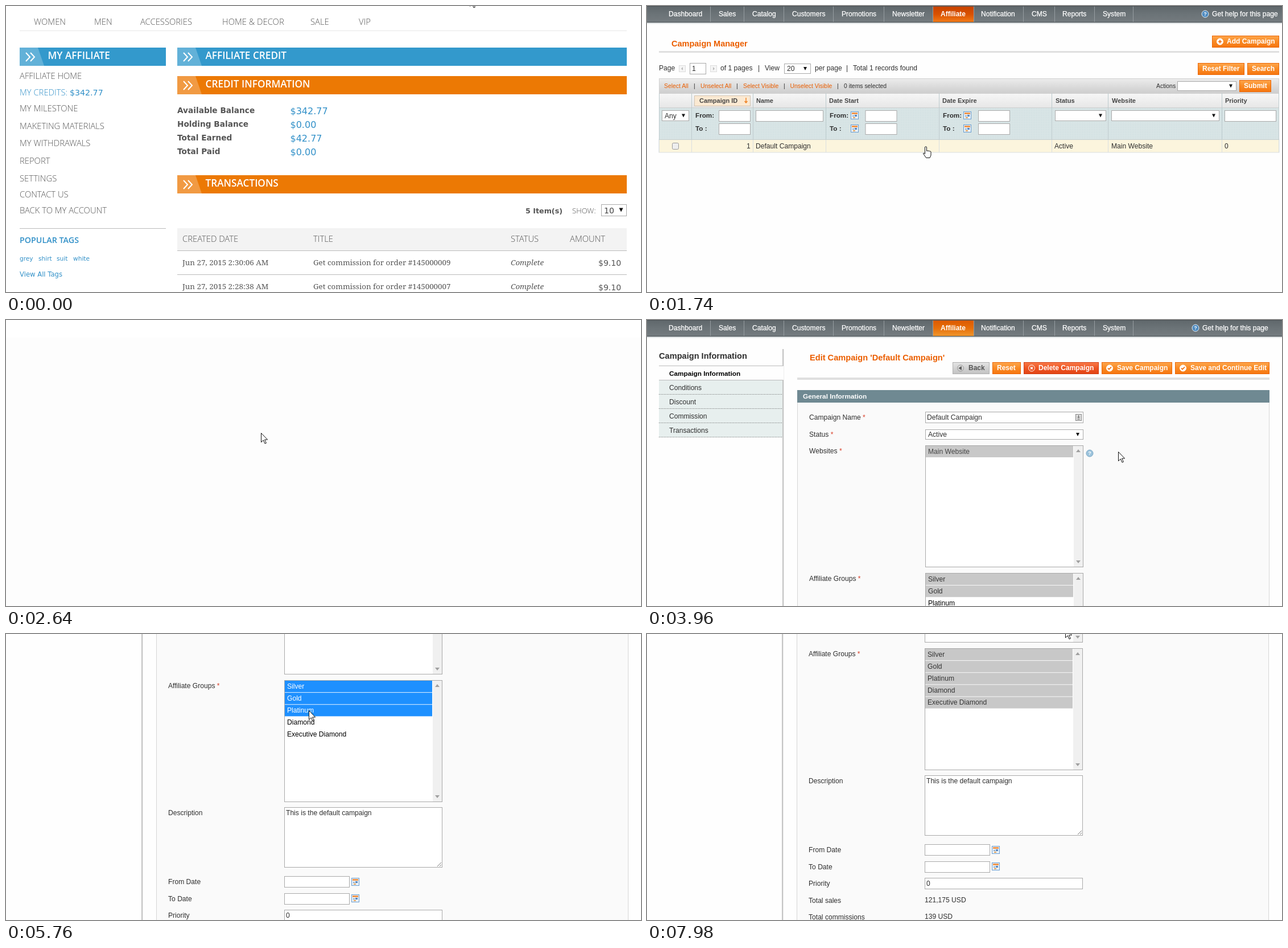
Recreate the animation shown at these times as an HTML page. Size 1116x502 px, loop 8000 ms.

```html
<!DOCTYPE html>
<html lang="en">
<head>
<meta charset="utf-8">
<title>Affiliate campaign walkthrough</title>
<style>
  html, body { margin: 0; width: 100%; height: 100%; overflow: hidden; background: #fff; }
  svg { display: block; width: 1116px; height: 502px; font: 12.1px "Liberation Sans", Arial, sans-serif; }
  text { white-space: pre; }
  .b { font-weight: 700; }
  .shop { font-family: "Open Sans", sans-serif; font-weight: 600; }
  .light { font-weight: 300; }
  .wide { font-family: "DejaVu Sans", Verdana, sans-serif; }
  .serif { font-family: "Noto Serif", Georgia, serif; }
  .nav { stroke: #fff; stroke-width: .25px; }
</style>
</head>
<body>
<svg id="stage" viewBox="0 0 1116 502"></svg>
<script>
const LOOP = 8000, STEP = 60;
const INK = '#2f2f2f', ORANGE = '#eb5e00', BLUE = '#3190c8';

// Drawing helpers. Text is placed by the vertical middle of its capitals, on a whole-pixel baseline.
const text = (x, mid, str, { size = 12.1, fill = INK, cls = '', extra = '' } = {}) =>
  `<text x="${x}" y="${Math.round(mid + size * .36)}" font-size="${size}" fill="${fill}" class="${cls}" ${extra}>${str}</text>`;
const bold = (x, mid, str, fill = INK, size = 12) => text(x, mid, str, { size, fill, cls: 'b' });
const rect = (x, y, w, h, fill, extra = '') =>
  `<rect x="${x}" y="${y}" width="${w}" height="${h}" fill="${fill}" ${extra}/>`;
const path = (d, fill = 'none', extra = '') => `<path d="${d}" fill="${fill}" ${extra}/>`;
const frame = (x, y, w, h, fill = '#fff', line = '#aaa') =>
  rect(x + .5, y + .5, w - 1, h - 1, fill, `stroke="${line}"`);
const each = (list, fn) => list.map(fn).join('');
const gradient = (id, ...stops) => `<linearGradient id="${id}" x2="0" y2="1">` +
  each(stops, (c, i) => `<stop offset="${i / (stops.length - 1)}" stop-color="${c}"/>`) + '</linearGradient>';
const triangle = (x, y, s, fill = '#111') => path(`M${x - s} ${y - s}h${2 * s}l${-s} ${2 * s}z`, fill);
const select = (x, y, w, h, label = '') =>
  frame(x, y, w, h) + text(x + 5, y + h / 2, label) + triangle(x + w - 10, y + h / 2, 3);
const calendar = (x, y) => frame(x, y, 14, 14, '#e8f1fa', '#6d9fd0') + rect(x + 2, y + 2, 10, 3, '#f0954a') +
  rect(x + 3, y + 7, 3, 2, '#8fa9c4') + rect(x + 7, y + 6, 4, 3, '#5b88bd') + rect(x + 4, y + 10, 4, 2, '#e3a35c');
const help = (x, y, dark) => `<circle cx="${x}" cy="${y}" r="6" fill="${dark ? '#4f8bc0' : '#9cc3dc'}" stroke="${dark ? '#e4f0fa' : '#7da9c6'}"/>` +
  text(x, y, '?', { size: 9, fill: '#fff', cls: 'b', extra: 'text-anchor="middle"' });
const button = (x, y, w, label, tx, kind = 'orange', icon = '') => {
  const line = { orange: '#ed6502', red: '#d33c10', grey: '#b0b0b0' }[kind];
  const ink = kind === 'grey' ? '#555' : '#fff';
  const mark = { plus: 'M-3 0h6M0-3v6', tick: 'M-3 0l2 2 4-4', cross: 'M-2-2l4 4M2-2l-4 4', back: 'M1-2l-3 2 3 2z' }[icon];
  const solid = icon === 'plus' || icon === 'tick';
  const badge = icon && `<g transform="translate(${x + 14} ${y + 10.5})"><circle r="5.5" fill="${solid ? '#fff' : 'none'}" stroke="${kind === 'grey' ? '#999' : '#fff'}"/>` +
    path(mark, 'none', `stroke="${solid ? '#ed6502' : ink}" stroke-width="1.7"`) + '</g>';
  return frame(x, y, w, 21, `url(#${kind})`, line) + badge + bold(tx, y + 10, label, ink);
};

function shopPage() {
  const thin = (x, y, s, fill = '#555', size = 14.8) => text(x, y, s, { size, fill, cls: 'shop light' });
  const wide = (x, y, s, size, fill = BLUE, weight = '') => text(x, y, s, { size, fill, cls: 'wide ' + weight });
  const serif = (x, y, s, extra = '') => text(x, y, s, { size: 13.4, fill: '#555', cls: 'serif', extra });
  const bar = (x, y, w, color, light, label) => rect(x, y, w, 32, color) +
    path(`M${x} ${y}h32l11 32h-43z`, light) +
    path(`M${x + 11} ${y + 9}l7 7.5-7 7.5m8-15l7 7.5-7 7.5`, 'none', 'stroke="#fff" stroke-width="2"') +
    text(x + 49.5, y + 14, label, { size: 17.2, fill: '#fff', cls: 'shop' });
  const blue = ['#3399cc', '#62b1d8'], orange = ['#ec7904', '#f19a43'];
  const row = (y, time, order) => serif(310, y, time) + serif(540, y, 'Get commission for order #' + order) +
    serif(887, y, 'Complete', 'font-style="italic"') + wide(1041, y + 1, '$9.10', 14, '#555');
  return rect(0, 0, 1116, 502, '#fff') +
    each([[49, 'WOMEN'], [155, 'MEN'], [236, 'ACCESSORIES'], [380, 'HOME &amp; DECOR'], [535, 'SALE'], [620, 'VIP']],
      ([x, s]) => thin(x, 28, s)) +
    rect(24, 43, 1067, 1, '#e6e6e6') +
    bar(24, 73, 257, ...blue, 'MY AFFILIATE') + bar(301, 73, 790, ...blue, 'AFFILIATE CREDIT') +
    bar(301, 123, 790, ...orange, 'CREDIT INFORMATION') + bar(301, 297, 790, ...orange, 'TRANSACTIONS') +
    each([[123, 'AFFILIATE HOME'], [180, 'MY MILESTONE'], [211, 'MAKETING MATERIALS'], [241, 'MY WITHDRAWALS'],
      [272, 'REPORT'], [303, 'SETTINGS'], [331, 'CONTACT US'], [359, 'BACK TO MY ACCOUNT']], ([y, s]) => thin(24, y, s)) +
    thin(24, 152, 'MY CREDITS:', BLUE) + wide(112, 152, '$342.77', 14.2) +
    rect(24, 390, 257, 1, '#bbb') +
    text(24, 411, 'POPULAR TAGS', { size: 14.3, fill: BLUE, cls: 'shop' }) +
    each([[24, 'grey'], [57, 'shirt'], [89, 'suit'], [118, 'white']], ([x, s]) => wide(x, 443.5, s, 10.6)) +
    wide(24, 471, 'View All Tags', 11.6) +
    each([['Available Balance', '$342.77'], ['Holding Balance', '$0.00'], ['Total Earned', '$42.77'], ['Total Paid', '$0.00']],
      ([name, sum], i) => wide(301, 183 + i * 24, name, 13.7, '#555', 'b') + wide(499.5, 184 + i * 24, sum, 16)) +
    wide(913, 359, '5 Item(s)', 12.7, '#555', 'b') + thin(995, 359.5, 'SHOW:', '#555', 13.2) +
    frame(1046, 348, 45, 21) + wide(1051, 359, '10', 14, '#444') + triangle(1081, 358, 3.5) +
    rect(301, 390, 790, 39, '#f3f3f3') +
    each([[310, 'CREATED DATE'], [540, 'TITLE'], [887, 'STATUS'], [991, 'AMOUNT']], ([x, s]) => thin(x, 408.5, s)) +
    rect(301, 429, 790, 1, '#bbb') + rect(301, 471, 790, 1, '#bbb') +
    row(450, 'Jun 27, 2015 2:30:06 AM', '145000009') + row(492.5, 'Jun 27, 2015 2:28:38 AM', '145000007');
}

function adminNav(activeFill, helpX) {
  const items = [[38, 'Dashboard'], [126, 'Sales'], [185, 'Catalog'], [255, 'Customers'], [342, 'Promotions'],
    [431, 'Newsletter'], [516, 'Affiliate'], [587, 'Notification'], [676, 'CMS'], [730, 'Reports'], [801, 'System']];
  const plain = (x, s) => text(x, 14, s, { fill: '#fff', cls: 'nav' });
  return rect(0, 0, 1116, 28, 'url(#nav)') + rect(0, 0, 1116, 1, '#4a5155') +
    rect(0, 28, 1116, 1, '#4c5356') + rect(0, 29, 1116, 3, 'url(#navShade)') +
    rect(503, 1, 71, 27, `url(#${activeFill})`) +
    each([111, 170, 240, 327, 416, 502, 574, 661, 716, 786, 854], x => rect(x, 1, 1, 27, '#969da1')) +
    each(items, ([x, s]) => s === 'Affiliate' ? bold(x, 14, s, '#fff') : plain(x, s)) +
    help(helpX, 14, true) + plain(helpX + 12, 'Get help for this page');
}

function managerPage() {
  const small = (x, s, fill = ORANGE) => text(x, 140.5, s, { size: 10.4, fill });
  const range = x => frame(x, 183, 56, 20) + frame(x, 206, 56, 20);
  const fromTo = x => bold(x, 192, 'From:', INK, 11.7) + bold(x, 215, 'To :', INK, 11.7);
  const pager = (x, dir) => frame(x, 104, 12, 12, '#f5f5f5', '#ddd') +
    path(`M${x + 6 - dir} 107l${dir * 3} 3l${-dir * 3} 3z`, '#bbb');
  return rect(0, 0, 1116, 502, '#fefefe') + adminNav('hot', 981) +
    bold(43, 66, 'Campaign Manager', ORANGE, 14.5) + button(993, 52, 118, 'Add Campaign', 1019, 'orange', 'plus') +
    rect(21, 79, 1090, 3, '#dfdfdf') +
    text(21, 109, 'Page') + pager(56, -1) + frame(75, 100, 29, 20) + text(79, 110, '1') + pager(111, 1) +
    text(129, 109, 'of 1 pages') + text(195, 109, '|') + text(207, 109, 'View') + select(241, 101, 47, 18, '20') +
    text(295, 109, 'per page') + text(350, 109, '|') + text(362, 109, 'Total 1 records found') +
    button(968, 100, 82, 'Reset Filter', 976) + button(1055, 100, 56, 'Search', 1063) +
    frame(21, 127, 1090, 26, 'url(#mass)', '#d1d1d1') +
    each([[30, 'Select All'], [94, 'Unselect All'], [169, 'Select Visible'], [251.5, 'Unselect Visible']], ([x, s]) => small(x, s)) +
    each([82, 157, 240, 334], x => small(x, '|', INK)) + small(346, '0 items selected', INK) + small(895, 'Actions', INK) +
    select(932, 132, 104, 17) + button(1041, 130, 56, 'Submit', 1049) +
    frame(21, 153, 1090, 26, 'url(#head)', '#cfcfcf') + rect(21, 179, 1090, 55, '#d9e5e6') + rect(21, 179, 1090, 55, 'url(#weave)') +
    `<rect id="row" x="21" y="234" width="1090" height="23" stroke="#dadfe0"/>` +
    each([21, 78, 186, 314, 513, 711, 810, 1010, 1110], x => rect(x, 153, 1, 81, '#bccacd') + rect(x, 234, 1, 23, '#dadfe0')) +
    rect(21, 234, 1090, 1, '#c3cfd1') +
    rect(83.5, 157.5, 98, 18, '#fbe9d2', 'stroke="#b09a80" stroke-dasharray="1 1"') +
    path('M174 161v9m-2.5-3l2.5 3 2.5-3', 'none', 'stroke="#f08020" stroke-width="1.4"') +
    each([[92, 'Campaign ID'], [192, 'Name'], [320, 'Date Start'], [519, 'Date Expire'], [718, 'Status'], [817, 'Website'], [1016, 'Priority']],
      ([x, s]) => bold(x, 166.5, s, '#444', 11)) +
    select(26, 183, 48, 19, 'Any') + each([126, 383.5, 582], range) + each([85, 321, 520], fromTo) +
    each([358, 556], x => calendar(x, 185) + calendar(x, 208)) +
    frame(191, 183, 119, 20) + select(717, 183, 90, 19) + select(816, 183, 190, 19) + frame(1015, 183, 91, 20) +
    rect(44.5, 240.5, 11, 11, '#eee', 'stroke="#999" rx="2"') +
    each([[175, '1'], [191, 'Default Campaign'], [716, 'Active'], [816, 'Main Website'], [1015, '0']], ([x, s]) => text(x, 245.5, s));
}

const groups = ['Silver', 'Gold', 'Platinum', 'Diamond', 'Executive Diamond'];

function editPage() {
  const label = (y, s, must) => text(285, y, s + (must ? ' <tspan fill="#d9402a">*</tspan>' : ''));
  const list = y => frame(489, y, 278, 214, '#fff', '#a9a9a9') + rect(750, y + 1, 16, 212, '#f0f0f0') +
    path(`M754 ${y + 12}l4-5 4 5z`, '#a0a0a0') + path(`M754 ${y + 202}l4 5 4-5z`, '#a0a0a0');
  const tab = (s, i) => rect(21, 106 + i * 25, 218, 25, '#e7efee') + text(39, 119 + i * 25, s) +
    path(`M21 ${130.5 + i * 25}h218`, 'none', 'stroke="#666" stroke-dasharray="1 1.5"');
  return rect(0, 0, 1116, 1000, '#fefefe') + adminNav('warm', 964) +
    bold(21, 63, 'Campaign Information', INK, 14.6) + rect(21, 80, 218, 1, '#bbb') +
    bold(39, 94, 'Campaign Information', '#000', 11.8) + rect(21, 105, 218, 1, '#bbb') +
    each(['Conditions', 'Discount', 'Commission', 'Transactions'], tab) +
    rect(238, 51, 2, 950, '#c4c4c4') + rect(240, 51, 1, 950, '#eee') + rect(236, 81, 4, 24, '#fefefe') +
    bold(286, 66, "Edit Campaign 'Default Campaign'", ORANGE, 14.6) +
    button(537, 74, 65, 'Back', 565, 'grey', 'back') + button(607, 74, 50, 'Reset', 615) +
    button(662, 74, 132, 'Delete Campaign', 688, 'red', 'cross') +
    button(799, 74, 124, 'Save Campaign', 826, 'orange', 'tick') +
    button(928, 74, 166, 'Save and Continue Edit', 955, 'orange', 'tick') +
    rect(264, 101, 830, 4, '#dfdfdf') +
    frame(264, 123, 830, 900, '#fafafa', '#d6d6d6') + rect(264, 123, 830, 22, '#6f8992') +
    bold(274, 134, 'General Information', '#fff', 11.8) +
    label(171, 'Campaign Name', true) + frame(489, 161, 278, 20) + text(492, 171, 'Default Campaign') +
    frame(753, 165, 11, 12, '#ddd', '#888') + path('M758.5 167v4m-2-1l2 2 2-2m-4 4h4', 'none', 'stroke="#555"') +
    label(201, 'Status', true) + select(489, 192, 278, 18, 'Active') +
    label(230, 'Websites', true) + list(220) + rect(490, 221, 259, 20, '#c8c8c8') + text(494, 231, 'Main Website', { fill: '#444' }) +
    help(778, 234) +
    label(453.5, 'Affiliate Groups', true) + list(444) +
    each(groups, (s, i) => `<g class="option">${rect(490, 445 + i * 21.1, 259, 20.2, '#fff')}${text(494, 454.5 + i * 21.1, s)}</g>`) +
    label(677, 'Description') + frame(489, 667, 278, 106, '#fff', '#a9a9a9') + text(492, 677, 'This is the default campaign') +
    path('M758 771l7-7m-3 7l3-3', 'none', 'stroke="#777"') +
    label(797.5, 'From Date') + frame(489, 788, 115, 20) + calendar(607, 791) +
    label(827.5, 'To Date') + frame(489, 818, 115, 20) + calendar(607, 820) +
    label(857, 'Priority') + frame(489, 847, 278, 20) + text(492, 857, '0') +
    label(887, 'Total sales') + text(489, 886, '121,175 USD') +
    label(916, 'Total commissions') + text(489, 915, '139 USD');
}

const defs = gradient('nav', '#5f676b', '#6b7377', '#747b7f') + gradient('navShade', '#bfc6c9', '#fefefe') +
  gradient('hot', '#c84300', '#d95100', '#f27a18') + gradient('warm', '#dd5a00', '#e66f0a', '#f0962c') +
  gradient('orange', '#fda64c', '#f98a24', '#f67610') + gradient('red', '#f87a48', '#ee5523', '#e24414') +
  gradient('grey', '#e4e4e4', '#d2d2d2', '#c2c2c2') + gradient('mass', '#ececec', '#cecece') + gradient('head', '#f6f6f6', '#e7e7e7') +
  `<pattern id="weave" width="3" height="3" patternUnits="userSpaceOnUse">${rect(0, 0, 1, 1, '#c6d9db')}</pattern>`;

const stage = document.getElementById('stage');
stage.innerHTML = `<defs>${defs}</defs>` +
  `<g id="shop">${shopPage()}</g><g id="manager">${managerPage()}</g>` +
  `<g id="blank">${rect(0, 0, 1116, 502, '#fdfdfd') + rect(0, 0, 1116, 31, '#fff')}</g>` +
  `<g id="edit">${editPage()}</g><g id="cursor">` +
  path('M.5.5v16l3.8-3.6 2.8 6.1 2.3-1-2.8-6h5z', '#fff', 'id="arrow" stroke="#111"') +
  path('M1.5 1.5q1.5-1.5 3 0v7q1-1 2.5 0 1-1 2.5.5 1.5-1 2.5 1v6l-2 4.5h-6.5l-5-7.5q0-2 3 .5z', '#fff', 'id="hand" stroke="#111"') + '</g>';

const $ = id => document.getElementById(id);
const show = (id, on) => $(id).style.display = on ? '' : 'none';
const options = [...document.querySelectorAll('.option')];

// Pointer waypoints: time, x, y
const pointer = [[0, 815, -16], [1079, 815, -16], [1080, 556, 57], [1500, 500, 215], [1800, 484, 254], [2400, 484, 254],
  [2520, 493, 208], [3240, 222, 150], [3360, 218, 143], [3960, 828, 231], [4380, 828, 231], [4860, 804, 232],
  [5160, 540, 84], [5400, 540, 84], [6000, 527, 168], [6660, 527, 183], [6840, 540, 215], [6900, 577, 276],
  [7020, 605, 301], [7380, 827, 180], [7620, 780, 0], [7980, 735, -10], [LOOP, 735, -10]];

function pointAt(t) {
  const i = pointer.findIndex(p => p[0] > t);
  const [t0, x0, y0] = pointer[i - 1], [t1, x1, y1] = pointer[i];
  const k = (t - t0) / (t1 - t0);
  return [Math.round(x0 + (x1 - x0) * k), Math.round(y0 + (y1 - y0) * k)];
}

function draw(time) {
  const t = Math.floor(time / STEP) * STEP;
  const [x, y] = pointAt(t);
  const scene = t < 840 ? 'shop' : t < 2460 ? 'manager' : t < 2760 ? 'blank' : 'edit';
  for (const id of ['shop', 'manager', 'blank', 'edit']) show(id, id === scene);

  const onRow = scene === 'manager' && t >= 1080 && y >= 234;
  $('row').setAttribute('fill', onRow ? '#fcf5dd' : '#f6f6f6');
  show('cursor', t < 60 || t >= 1080);
  $('cursor').setAttribute('transform', `translate(${x} ${y})`);
  show('hand', onRow && t < 2220);
  show('arrow', !(onRow && t < 2220));

  const pan = Math.min(1, Math.max(0, (t - 7620) / 360));
  const scroll = (t < 4200 ? 0 : t < 4380 ? 121 : t < 4560 ? 242 : 363) + Math.round(56 * pan);
  $('edit').setAttribute('transform', `translate(${-Math.round(pan)} ${-scroll})`);

  const dragging = t >= 5220 && t < 7680;
  const last = t < 6000 ? Math.floor((y - 82) / 21) : 4;
  options.forEach((option, i) => {
    const chosen = t < 5220 ? i !== 2 : i <= last;
    const [box, name] = option.children;
    box.setAttribute('fill', !chosen ? '#fff' : dragging ? '#1e90ff' : '#c8c8c8');
    name.setAttribute('fill', !chosen ? '#000' : dragging ? '#fff' : '#333');
  });
}

const start = performance.now();
function tick() {
  draw((performance.now() - start) % LOOP);
  requestAnimationFrame(tick);
}
draw(0);
requestAnimationFrame(tick);
</script>
</body>
</html>
```
